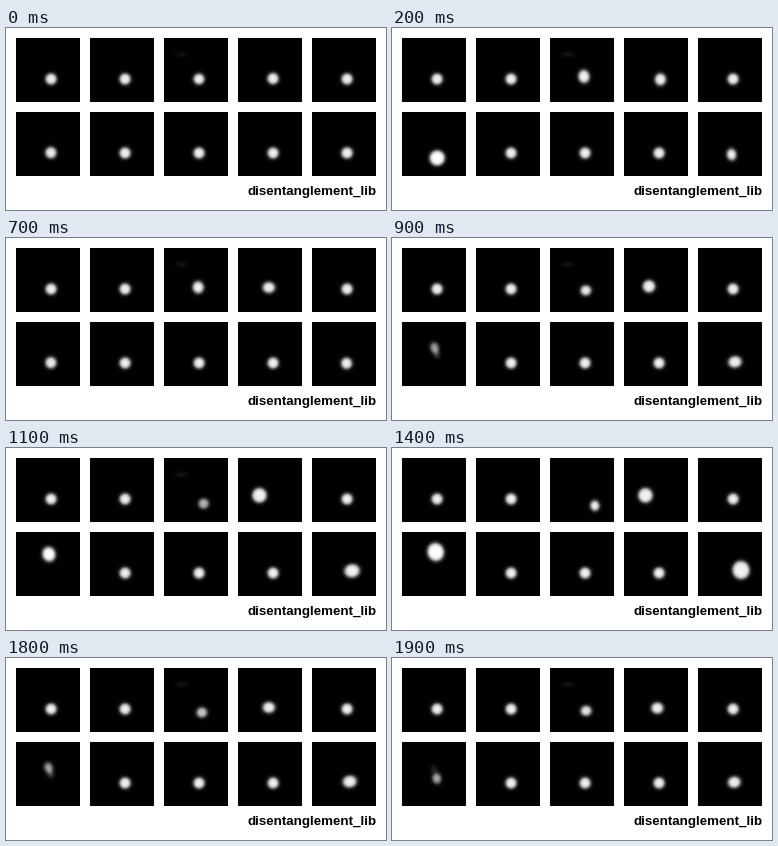
Animation, 380 px wide and 182 px high, one loop 2000 ms. Source, as a matplotlib script:

```python
import numpy as np
import matplotlib.pyplot as plt
from matplotlib.animation import FuncAnimation

W, H, DPI = 380, 182, 100
SIZE, GAP, COLS = 64, 10, 5
FRAMES, INTERVAL = 20, 100
EDGE = 1.0  # softness of the blob rim in pixels
LIGHT = 0.95

yy, xx = np.mgrid[:SIZE, :SIZE].astype(float)
tanh = np.tanh


def latent(start, frame):
    """Normal quantile of a probability that cycles from start up, down and back."""
    p = (start + 2 * frame / FRAMES) % 2
    u = np.clip(min(p, 2 - p), 0.01, 0.99)
    return (u**0.135 - (1 - u)**0.135) / 0.1975


def step(z, at, width):
    return 1 / (1 + np.exp(np.clip((at - z) / width, -50, 50)))


def bump(z, at, width):
    return np.exp(-((z - at) / width)**2)


def blob(x, y, rx, ry, light=LIGHT, tilt=0):
    c, s = np.cos(np.radians(tilt)), np.sin(np.radians(tilt))
    dx, dy = xx - x, yy - y
    d = np.hypot((c * dx + s * dy) / rx, (c * dy - s * dx) / ry)
    return light * step((1 - d) * min(rx, ry), 0, EDGE)


def still(z):
    return blob(34.6, 40.5, 5.25, 5.25)


def stretch(z):
    ghost = blob(17, 16, 4, 1.8, 0.1 * step(z, -1.8, 0.15))
    return ghost + blob(
        38.8 - 5.6 * tanh(1.5 * (z + 0.45)), 42.1 - 5.1 * tanh(1.4 * z),
        5.0 + 0.35 * z, 4.7 + 1.75 * max(z, 0),
        LIGHT - 0.25 * bump(z, -0.5, 0.35) + 0.05 * step(z, 1, 0.2), -6)


def slide(z):
    return blob(
        28.1 + 7.9 * tanh(1.55 * z + 0.1), 38.7 + 2.4 * tanh(z),
        5.2 + 1.7 * max(-z, 0) + 0.6 * bump(z, 0.2, 0.35),
        5.1 + 1.9 * max(-z, 0) + 0.35 * max(z, 0))


def jump(z):
    """One blob fades out above while another fades in below."""
    upper = 3.2 + 5.2 * tanh(max(-z, 0))
    lower = 3.4 + 5.1 * tanh(z)
    return (blob(31.9 - 0.8 * z, 26.1 + 7 * tanh(1.1 * z), upper, upper + 0.8,
                 step(-z, 0.08, 0.1), -15)
            + blob(34.2 + 0.5 * z, 33.7 + 13.2 * tanh(1.4 * z), max(lower, 2.6),
                   max(lower, 2.6) + 0.9 * bump(z, 0, 0.25),
                   step(z, 0.03, 0.14), -10))


def split(z):
    ghost = blob(26.7, 16.5, 2.8, 3.8, 0.6 * step(z, 1.65, 0.12), -8)
    return ghost + blob(
        37.6 - 5.1 * tanh(1.2 * (z + 0.25)), 40.4 + 2.9 * tanh(z - 0.3),
        6.1 - 2.3 * tanh(z), 5.3 + 1.8 * max(-z, 0), LIGHT, -8)


# Motion rule and starting probability of each panel, row by row.
PANELS = [(still, 0.5), (still, 0.5), (stretch, 0.59), (slide, 0.75), (still, 0.5),
          (jump, 0.65), (still, 0.5), (still, 0.5), (still, 0.5), (split, 0.625)]


def stage(frame):
    out = np.ones((H, W))
    for i, (draw, start) in enumerate(PANELS):
        row, col = divmod(i, COLS)
        y, x = GAP + row * (SIZE + GAP), GAP + col * (SIZE + GAP)
        out[y:y + SIZE, x:x + SIZE] = np.clip(draw(latent(start, frame)), 0, 1)
    return out


fig = plt.figure(figsize=(W / DPI, H / DPI), dpi=DPI, facecolor="white")
ax = fig.add_axes([0, 0, 1, 1])
ax.axis("off")
image = ax.imshow(stage(0), cmap="gray", vmin=0, vmax=1,
                  interpolation="nearest", aspect="auto")
fig.text(370.5 / W, 1 - 167.5 / H, "disentanglement_lib", ha="right",
         va="baseline", family="Liberation Sans", weight="bold", size=9.68,
         color="black")


def update(frame):
    image.set_data(stage(frame))
    return [image]


anim = FuncAnimation(fig, update, frames=FRAMES, interval=INTERVAL,
                     repeat=True, repeat_delay=0, blit=False)
plt.show()
```
